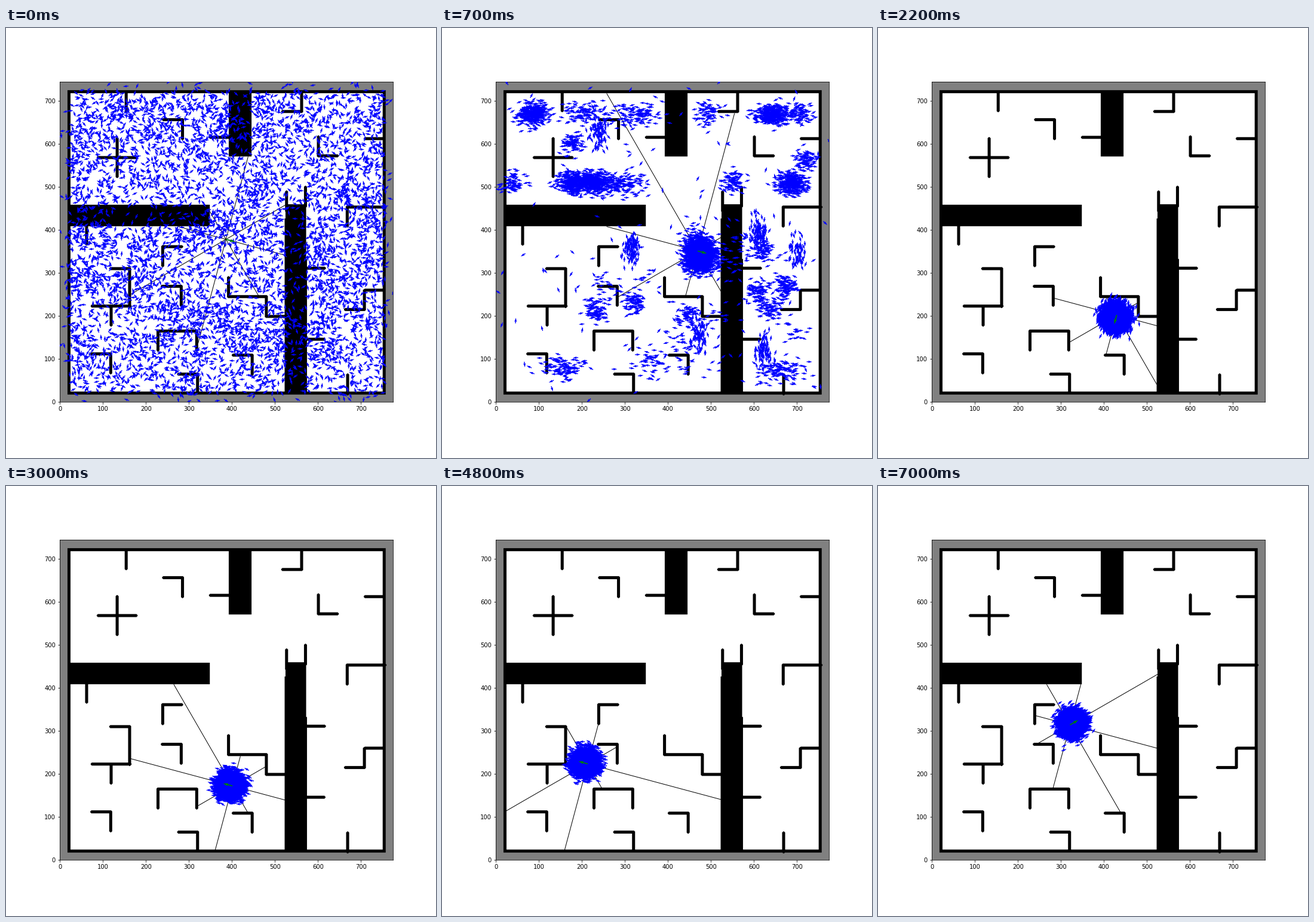
These frames come from a looping animation (720 by 720 pixels, 7100 ms). A matplotlib script:

```python
import numpy as np
import matplotlib.pyplot as plt
from matplotlib.animation import FuncAnimation

W, H = 775, 745
FRAMES = 71
COUNT = 6000
ARM = 44  # length of one wall piece
STEP = {"L": (-ARM, 0), "R": (ARM, 0), "U": (0, ARM), "D": (0, -ARM)}

# Wall corners and the pieces leaving them; a repeated letter is longer
WALLS = [
    (154, 720, "D"), (285, 655, "LD"), (133, 567, "LRUD"), (394, 614, "L"),
    (562, 674, "LU"), (601, 571, "UR"), (754, 611, "L"), (668, 452, "DRR"),
    (62, 410, "D"), (239, 360, "DR"), (527, 443, "U"), (571, 454, "U"),
    (392, 244, "URR"), (480, 198, "UR"), (571, 310, "R"), (570, 145, "R"),
    (708, 214, "LU"), (754, 259, "L"), (669, 18, "U"), (162, 309, "LDD"),
    (119, 222, "LDR"), (282, 268, "LD"), (228, 164, "DRR"), (318, 164, "D"),
    (118, 111, "LD"), (447, 108, "LD"), (320, 64, "LD"),
]
BLOCKS = [(20, 408, 349, 458), (393, 570, 446, 722), (525, 18, 573, 459),
          (523, 18, 560, 426), (550, 18, 575, 332)]

# Hypotheses: weight, spread x, spread y, centres
EARLY = [
    (12, 18, 12, [(79, 669), (650, 668), (174, 510), (238, 511), (682, 507),
                  (477, 320)]),
    (4, 26, 13, [(202, 671), (339, 667), (292, 508), (160, 80), (660, 72)]),
    (3, 10, 20, [(240, 631), (315, 353), (704, 356), (476, 148), (611, 400),
                 (624, 113)]),
    (2.8, 13, 13, [(497, 671), (700, 671), (44, 510), (546, 512), (678, 268),
                   (438, 200), (183, 600), (715, 562), (628, 349), (604, 262),
                   (329, 231), (229, 212), (640, 220)]),
]
LATE = [
    (12, 13, 11, [(160, 532), (715, 660)]),
    (3, 35, 11, [(125, 530)]),
    (1.3, 13, 11, [(125, 655), (615, 270), (455, 50), (44, 523)]),
    (0.35, 7, 7, [(62, 495), (186, 664), (180, 495), (232, 525), (601, 502),
                  (608, 50), (674, 307), (290, 342)]),
]

# Robot route: frame, x, y
ROUTE = np.array([
    (0, 386, 378), (7, 469, 351), (9, 469, 351), (15, 452, 284),
    (25, 420, 167), (28, 420, 167), (30, 401, 172), (41, 296, 201),
    (51, 178, 233), (54, 178, 233), (56, 200, 245), (70, 321, 314)])
# Frames at which the robot turns right by 45 degrees
TURNS = (8, 9, 26, 27, 52, 53, 54)


def build_map():
    """White floor, grey outside, black walls."""
    gy, gx = np.mgrid[0:H, 0:W].astype(float)
    grid = np.ones((H, W))
    grid[(gx < 21) | (gx > 754) | (gy < 20) | (gy > 720)] = 0.5
    edge = np.maximum(abs(gx - 387.5) - 366.5, abs(gy - 370) - 350)
    grid[abs(edge) < 3.5] = 0
    for x, y, arms in WALLS:
        for arm in set(arms):
            dx, dy = np.array(STEP[arm]) * arms.count(arm)
            t = ((gx - x) * dx + (gy - y) * dy) / (dx * dx + dy * dy)
            t = np.clip(t, 0, 1)
            grid[np.hypot(gx - x - t * dx, gy - y - t * dy) < 3.5] = 0
    for x0, y0, x1, y1 in BLOCKS:
        grid[y0:y1, x0:x1] = 0
    return grid


def pose(n):
    x = np.interp(n, ROUTE[:, 0], ROUTE[:, 1])
    y = np.interp(n, ROUTE[:, 0], ROUTE[:, 2])
    heading = -15 - 45 * sum(n >= t for t in TURNS)
    return x, y, np.radians(heading)


def cast_rays(x, y):
    """End points of the eight range beams."""
    t = np.arange(0, 1100, 0.5)
    ends = []
    for a in np.radians(30 + 45 * np.arange(8)):
        px, py = x + t * np.cos(a), y + t * np.sin(a)
        ix = np.clip(px.round().astype(int), 0, W - 1)
        iy = np.clip(py.round().astype(int), 0, H - 1)
        hit = np.argmax(grid[iy, ix] == 0)
        ends.append((px[hit], py[hit]))
    return ends


def draw_scatter():
    """Start cloud: mostly even, with some clumps, sparse off the floor."""
    centres = rng.uniform((20, 20), (755, 720), (70, 2))
    clumps = centres[rng.integers(0, 70, COUNT)] + rng.normal(0, 22, (COUNT, 2))
    even = rng.uniform((0, 0), (W, H), (3 * COUNT, 2))
    points = rng.permutation(np.vstack([clumps, even]))
    points = np.clip(points, 2, (W - 2, H - 2))
    shade = grid[points[:, 1].astype(int), points[:, 0].astype(int)]
    keep = np.select([shade == 1, shade == 0.5], [1, 0.12], 0.42)
    return points[rng.random(len(points)) < keep][:COUNT]


def draw_hypotheses(groups, anchor):
    """Assign every particle to one hypothesis around the anchor frame."""
    spots = np.array([(x, y, sx, sy) for _, sx, sy, centres in groups
                      for x, y in centres], float)
    weight = np.array([w for w, _, _, centres in groups for _ in centres])
    pick = rng.choice(len(spots), COUNT, p=weight / weight.sum())
    wide = spots[:, 2] >= spots[:, 3]
    flip = np.arange(len(spots)) % 2 * np.pi
    heading = np.where(wide, 0, np.pi / 2) + flip
    points = spots[pick, :2] + rng.normal(size=(COUNT, 2)) * spots[pick, 2:]
    return points, heading[pick] + rng.normal(0, 0.3, COUNT), anchor


def follow(hypotheses, n):
    """Carry particles along the robot's relative motion from the anchor."""
    points, heading, anchor = hypotheses
    x0, y0, a0 = pose(anchor)
    x, y, a = pose(n)
    turn = heading - a0
    c, s = np.cos(turn), np.sin(turn)
    shift = np.column_stack([c * (x - x0) - s * (y - y0),
                             s * (x - x0) + c * (y - y0)])
    return points + shift, heading + a - a0


def particles(n):
    noise = np.random.default_rng(500 + n)
    x, y, a = pose(n)
    early, early_angle = follow(early_set, n)
    late, late_angle = follow(late_set, n)
    moved = n >= switch
    pts = np.where(moved[:, None], late, early)
    ang = np.where(moved, late_angle, early_angle)

    lost = rank > 1 - np.exp(-0.5 * n)
    drift = 12.2 * n * np.column_stack([np.cos(scatter_angle),
                                        np.sin(scatter_angle)])
    pts[lost] = (scatter + drift)[lost]
    ang[lost] = scatter_angle[lost]

    found = rank < np.interp(n, [0, 3, 7, 15, 22], [0, 0.1, 0.27, 0.87, 1.01])
    spread = np.interp(n, [0, 7, 15, 25], [22, 16, 14.5, 13.5])
    cloud = (x, y) + spread * noise.normal(size=(COUNT, 2))
    pts[found] = cloud[found]
    ang[found] = a + noise.normal(0, 0.25, found.sum())
    pts[~found] += noise.normal(0, 1.5, ((~found).sum(), 2))
    return pts, ang


rng = np.random.default_rng(7)
grid = build_map()
scatter = draw_scatter()
scatter_angle = rng.uniform(-np.pi, np.pi, COUNT)
sparse = rng.uniform((40, 50), (740, 400), (14, 2))
early_set = draw_hypotheses(EARLY + [(0.7, 20, 18, sparse)], 7)
late_set = draw_hypotheses(LATE, 15)
rank = rng.random(COUNT)
switch = rng.uniform(8, 14.5, COUNT)

fig = plt.figure(figsize=(10, 10), dpi=72)
fig.subplots_adjust(left=0.125, right=0.9, bottom=0.125, top=0.88)
ax = fig.add_subplot()
ax.imshow(grid, cmap="gray", vmin=0, vmax=1, origin="lower")
ax.set_xticks(range(0, 701, 100))
ax.set_yticks(range(0, 701, 100))
ax.tick_params(labelsize=10)

beams = [ax.plot([], [], color="black", lw=1, zorder=2)[0] for _ in range(8)]
start = np.ones(COUNT)
swarm = ax.quiver(scatter[:, 0], scatter[:, 1], start, start, color="blue",
                  scale=60, scale_units="width", width=0.0024, zorder=3)
robot = ax.quiver([0], [0], [1], [0], color="green",
                  scale=35, scale_units="width", width=0.003, zorder=4)
ax.set_xlim(-0.5, W - 0.5)
ax.set_ylim(-0.5, H - 0.5)


def update(n):
    x, y, a = pose(n)
    for beam, (ex, ey) in zip(beams, cast_rays(x, y)):
        beam.set_data([x, ex], [y, ey])
    pts, ang = particles(n)
    swarm.set_offsets(pts)
    swarm.set_UVC(np.cos(ang), np.sin(ang))
    robot.set_offsets([(x, y)])
    robot.set_UVC([np.cos(a)], [np.sin(a)])
    return [*beams, swarm, robot]


anim = FuncAnimation(fig, update, frames=FRAMES, interval=100,
                     repeat=True, repeat_delay=0, blit=False)
plt.show()
```
